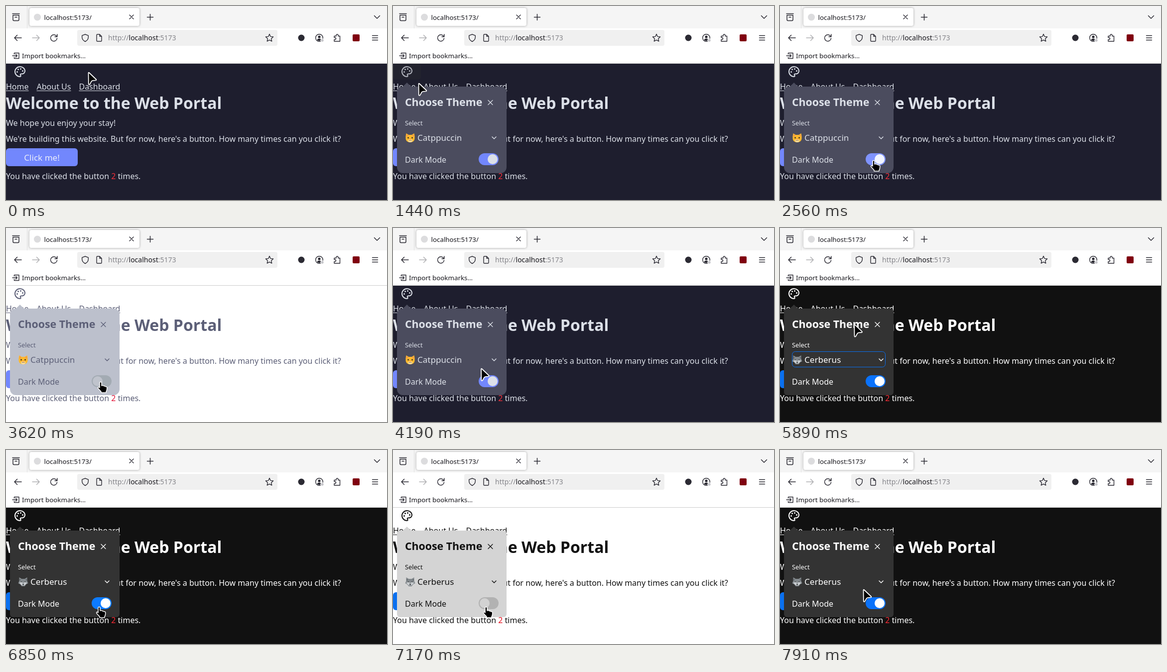
These frames come from a looping animation (765 by 390 pixels, 7.99 s). An HTML page with a canvas:

```html
<!DOCTYPE html>
<html lang="en">
<head>
<meta charset="utf-8">
<title>Theme switcher</title>
<style>
html, body { margin: 0; width: 100%; height: 100%; overflow: hidden; background: #fff; }
canvas { display: block; width: 765px; height: 390px; }
</style>
</head>
<body>
<canvas id="stage" width="765" height="390"></canvas>
<script>
const ctx = document.getElementById('stage').getContext('2d');
const LOOP = 7990, STEP = 80;
const SANS = '"Noto Sans", sans-serif';
const INK = '#2b2a33';

const THEMES = {
  catDark: { bg: '#1e1e2e', text: '#dce0e8', panel: '#4b4c5e', primary: '#7287fd', red: '#f5303a',
    track: '#7287fd', trackHover: '#7f93ff', thumb: '#dce0e8', thumbHover: '#f2f5ff', radius: 12, hover: '#22232e' },
  catLight: { bg: '#ffffff', text: '#5c5f77', panel: '#bcc0cc', primary: '#7287fd', red: '#e3173a',
    track: '#a3abb3', trackHover: '#a3abb3', thumb: '#bfc3cc', thumbHover: '#bfc3cc', radius: 12, hover: '#f4f4f6' },
  cerbDark: { bg: '#111111', text: '#ffffff', panel: '#333333', primary: '#0a70f0', red: '#fb2c36',
    track: '#0a72fb', trackHover: '#0d7bff', thumb: '#ffffff', thumbHover: '#ffffff', radius: 6, hover: '#1b1b1b' },
  cerbLight: { bg: '#ffffff', text: '#111111', panel: '#d4d4d4', primary: '#0a70f0', red: '#e7101f',
    track: '#b2b2b2', trackHover: '#b2b2b2', thumb: '#d2d2d2', thumbHover: '#d2d2d2', radius: 6, hover: '#f4f4f4' }
};

// Pointer path: time, x, y
const PATH = [
  [0, 165, 133], [320, 110, 163], [560, 54, 157], [800, 27, 131], [1200, 27, 131],
  [1440, 51, 155], [2000, 122, 253], [2560, 188, 311], [3300, 188, 311], [3460, 189, 309],
  [3540, 189, 309], [3620, 190, 310], [4030, 190, 310], [4350, 163, 254], [4930, 163, 254],
  [5490, 137, 160], [5650, 137, 160], [6450, 176, 272], [6850, 187, 316], [7670, 187, 316],
  [7910, 167, 280]
];
const BEATS = [0, 3380, 3950, 4680, 5010, 7750];
const TOGGLES = [2640, 3950, 7010, 7750];

const clamp = v => Math.max(0, Math.min(1, v));
const ramp = (t, from, len) => clamp((t - from) / len);

// Hold each picture for one step, counted from the latest beat
function hold(t) {
  const base = BEATS.filter(b => b <= t).pop();
  return base + Math.floor((t - base) / STEP) * STEP;
}

function pointerAt(t) {
  for (let i = 1; i < PATH.length; i++) {
    const [t0, x0, y0] = PATH[i - 1], [t1, x1, y1] = PATH[i];
    if (t <= t1) {
      const k = clamp((t - t0) / (t1 - t0));
      return { x: x0 + (x1 - x0) * k, y: y0 + (y1 - y0) * k };
    }
  }
  const [, x, y] = PATH[PATH.length - 1];
  return { x, y };
}

function box(x, y, w, h, r, fill, stroke, width = 1) {
  ctx.beginPath();
  ctx.roundRect(x, y, w, h, r);
  paint(fill, stroke, width);
}

function disc(x, y, r, fill, stroke, width = 1) {
  ctx.beginPath();
  ctx.arc(x, y, r, 0, Math.PI * 2);
  paint(fill, stroke, width);
}

function paint(fill, stroke, width) {
  if (fill) { ctx.fillStyle = fill; ctx.fill(); }
  if (stroke) { ctx.strokeStyle = stroke; ctx.lineWidth = width; ctx.stroke(); }
}

// Draws SVG path data with its origin at x, y
function shape(x, y, d, fill, stroke, width = 1.5) {
  const p = new Path2D(d);
  ctx.save();
  ctx.translate(x, y);
  ctx.lineCap = ctx.lineJoin = 'round';
  if (fill) { ctx.fillStyle = fill; ctx.fill(p); }
  if (stroke) { ctx.strokeStyle = stroke; ctx.lineWidth = width; ctx.stroke(p); }
  ctx.restore();
}

// Returns the x where the text ends
function label(str, x, y, size, color, weight = 400) {
  ctx.font = `${weight} ${size}px ${SANS}`;
  ctx.fillStyle = color;
  ctx.fillText(str, x, y);
  return x + ctx.measureText(str).width;
}

function drawBrowser() {
  ctx.fillStyle = '#f5f5f5';
  ctx.fillRect(0, 0, 765, 45);
  ctx.fillStyle = '#ffffff';
  ctx.fillRect(0, 45, 765, 71);
  ctx.fillStyle = '#cccccc';
  ctx.fillRect(0, 115, 765, 1);
  ctx.fillStyle = '#e0e0e0';
  ctx.fillRect(42, 0, 1, 45);

  // tab strip
  shape(12, 14, 'M1 1.5H15M2 4.5V13Q2 15.5 4 15.5H12Q14 15.5 14 13V4.5ZM6 8.5H10', null, INK);
  ctx.save();
  ctx.shadowColor = 'rgba(0,0,0,.35)';
  ctx.shadowBlur = 4;
  box(47, 4, 221, 36, 4, '#ffffff');
  ctx.restore();
  disc(63, 22.5, 7, '#dcdcde');
  label('localhost:5173/', 76.5, 28, 13.33, '#15141a');
  shape(252, 22, 'M-4 -4L4 4M4 -4L-4 4', null, INK, 1.4);
  shape(289.5, 22.5, 'M-6 0H6M0 -6V6', null, INK, 1.5);
  shape(745, 22, 'M-5.5 -2.5L0 3L5.5 -2.5', null, INK, 1.5);

  // navigation
  shape(24, 64, 'M7 0H-7M-1.5 -5.5L-7 0L-1.5 5.5', null, INK, 1.5);
  shape(60, 64, 'M-7 0H7M1.5 -5.5L7 0L1.5 5.5', null, '#b0b0b3', 1.5);
  shape(96, 64, 'M5.8 -2.8A6.5 6.5 0 1 0 6.5 1M6.8 -7V-2.3H2', null, INK, 1.5);
  box(143, 48, 402, 32, 4, '#f0f0f0');
  shape(159, 64, 'M0 -7L6.3 -4.7V-1Q6 4.5 0 7.5Q-6 4.5 -6.3 -1V-4.7Z', null, INK, 1.4);
  shape(187, 64, 'M-5 -5.5Q-5 -7 -3.5 -7H1L5 -3V5.5Q5 7 3.5 7H-3.5Q-5 7 -5 5.5ZM1 -7V-3H5', null, INK, 1.4);
  let x = label('http://', 205, 69, 14, '#85858a');
  x = label('localhost', x, 69, 14, '#15141a');
  label(':5173', x, 69, 14, '#85858a');

  ctx.beginPath();
  for (let i = 0; i < 10; i++) {
    const r = i % 2 ? 3.8 : 8, a = -Math.PI / 2 + i * Math.PI / 5;
    ctx.lineTo(529 + r * Math.cos(a), 64.5 + r * Math.sin(a));
  }
  ctx.closePath();
  ctx.lineJoin = 'round';
  paint(null, INK, 1.4);

  // toolbar buttons
  disc(593, 64, 6.5, INK);
  disc(629, 64, 7.3, null, INK, 1.4);
  disc(629, 62, 2.6, INK);
  shape(629, 64, 'M-4.5 4.5Q-4 1.5 0 1.5Q4 1.5 4.5 4.5Q0 7.5 -4.5 4.5Z', INK);
  disc(635, 69, 3.3, '#c7c7cb', '#ffffff', 1);
  shape(665, 64, 'M-6 -3.5H-2V-5A2 2 0 0 1 2 -5V-3.5H5.5V7H-6V3.5H-4.5A2 2 0 0 0 -4.5 -0.5H-6Z', null, INK, 1.4);
  box(696, 57, 14, 14, 2, '#800010');
  shape(741, 64, 'M-5.5 -4.5H5.5M-5.5 0H5.5M-5.5 4.5H5.5', null, INK, 1.4);

  // bookmarks bar
  shape(20, 100, 'M-3.5 -3V-5.5H6V5.5H-3.5V3M-7 0H2.5M-0.5 -3L2.5 0L-0.5 3', null, INK, 1.4);
  label('Import bookmarks…', 32, 105, 13.33, '#15141a');
}

function drawPage(th, hover) {
  ctx.fillStyle = th.bg;
  ctx.fillRect(0, 116, 765, 274);

  if (hover > 0) {
    ctx.globalAlpha = hover;
    box(0, 116, 56, 32, 6, th.hover);
  }
  ctx.globalAlpha = 1 - 0.22 * hover;
  shape(16, 120, 'M12 2C6.5 2 2 6.5 2 12s4.5 10 10 10c.93 0 1.65-.75 1.65-1.69 0-.44-.18-.83-.44-1.12' +
    '-.29-.29-.44-.65-.44-1.13a1.64 1.64 0 0 1 1.67-1.67h2c3.05 0 5.55-2.5 5.55-5.55C21.97 6 17.46 2 12 2z',
    null, th.text, 2);
  for (const [x, y] of [[13.5, 6.5], [17.5, 10.5], [8.5, 7.5], [6.5, 12.5]]) disc(16 + x, 120 + y, 1.5, th.text);
  ctx.globalAlpha = 1;

  let x = 0;
  for (const link of ['Home', 'About Us', 'Dashboard']) {
    const end = label(link, x, 168, 16, th.text);
    ctx.fillRect(x, 170, end - x, 1);
    x = end + 16;
  }
  label('Welcome to the Web Portal', 0, 207, 32, th.text, 700);
  label('We hope you enjoy your stay!', 0, 241, 16, th.text);
  label("We're building this website. But for now, here's a button. How many times can you click it?", 0, 273, 16, th.text);
  box(0, 286, 144, 36, 6, th.primary);
  label('Click me!', 36.3, 311, 17.07, '#eceffa');
  x = label('You have clicked the button ', 0, 348, 16, th.text);
  x = label('2', x, 348, 16, th.red);
  label(' times.', x, 348, 16, th.text);
}

function drawCat(x, y) {
  shape(x, y, 'M-8 -9L-3 -6H3L8 -9Q9.5 -3 9 2Q8 9 0 9Q-8 9 -9 2Q-9.5 -3 -8 -9Z', '#fcb92e');
  shape(x, y, 'M-7 -7L-4 -5L-7 -2ZM7 -7L4 -5L7 -2Z', '#f08a56');
  shape(x, y, 'M-5 5Q0 1 5 5Q4 9 0 9Q-4 9 -5 5Z', '#ffe3a0');
  disc(x - 4, y, 1.4, '#3a2b26');
  disc(x + 4, y, 1.4, '#3a2b26');
  shape(x, y, 'M-1.5 2.5H1.5L0 4Z', '#e5635f');
  shape(x, y, 'M-3 5Q-1.5 7 0 5Q1.5 7 3 5', null, '#6b4a2c', 0.8);
}

function drawWolf(x, y) {
  shape(x, y, 'M-8 -9L-3 -6H3L8 -9L8 -2L10 3L6 5L3 9H-3L-6 5L-10 3L-8 -2Z', '#83898d');
  shape(x, y, 'M-7 -6L-5 -4L-7 -2ZM7 -6L5 -4L7 -2Z', '#51575b');
  shape(x, y, 'M-8 2L-3 0L0 3L3 0L8 2L3 7H-3Z', '#c9cdd0');
  shape(x, y, 'M-5 -1L-2 0L-4 1ZM5 -1L2 0L4 1Z', '#222');
  shape(x, y, 'M-2 4H2L0 7Z', '#2d3033');
}

function drawPanel(th, alpha, s) {
  ctx.globalAlpha = alpha;
  shape(28, 154, 'M0 0L9 9H-9Z', th.panel);
  box(8, 162, 220, 174, th.radius, th.panel);
  label('Choose Theme', 24, 201, 21.34, th.text, 700);
  shape(195.5, 194, 'M-4.5 -4.5L4.5 4.5M4.5 -4.5L-4.5 4.5', null, th.text, 1.3);
  label('Select', 24, 240, 12.8, th.text);
  if (s.focus) box(24.5, 248.5, 187, 31, 6, null, th.primary, 1);
  if (s.cerberus) drawWolf(34.5, 265); else drawCat(34.5, 265);
  label(s.cerberus ? 'Cerberus' : 'Catppuccin', 49, 271, 17.07, th.text);
  shape(203, 265, 'M-4 -2L0 2L4 -2', null, th.text, 1.5);
  label('Dark Mode', 24, 315, 16, th.text);
  box(172, 296, 40, 24, 12, s.hot ? th.trackHover : th.track);
  disc(184 + 16 * s.slide, 308, 10, s.hot ? th.thumbHover : th.thumb);
  ctx.globalAlpha = 1;
}

function drawPointer(x, y, hand) {
  ctx.save();
  if (hand) {
    shape(x, y, 'M-2 1Q-1.8 -.5 0 -.5Q1.8 -.5 2 1V7L4 6.6Q6 6.5 6.6 7.8Q8.6 7.2 9.6 8.8Q12.5 8.2 12.8 11' +
      'L12.5 15Q12 17.5 11 19V21H1V19L-5 12.5Q-6 10.5 -4.5 9.7Q-3.3 9.3 -2 11Z', '#000', '#fff', 1.5);
  } else {
    shape(x, y, 'M.5 1.5Q.6 .2 1.8 1L16 14.5Q17 16.2 15 16.4L9.5 16.8Q7.5 17 6.5 18.6L3.2 24.5Q1.2 26 .8 23.5Z',
      '#000', '#fff', 1.8);
  }
  ctx.restore();
}

function draw(time) {
  const t = hold(time);
  const p = pointerAt(t);
  const cerberus = t >= 5730;
  const done = TOGGLES.filter(c => c <= t);
  const dark = done.length % 2 === 0;
  const k = done.length ? ramp(t, done[done.length - 1], 160) : 1;
  const th = THEMES[(cerberus ? 'cerb' : 'cat') + (dark ? 'Dark' : 'Light')];
  const onIcon = p.x < 56 && p.y < 148;
  const onToggle = p.x > 172 && p.x < 212 && p.y > 296 && p.y < 320;

  drawBrowser();
  drawPage(th, ramp(t, 640, 160) * (1 - ramp(t, 1440, 160)));
  const alpha = ramp(t, 900, 200);
  if (alpha > 0) {
    drawPanel(th, alpha, {
      cerberus,
      focus: t >= 4680 && t < 6850,
      hot: onToggle,
      slide: dark ? k : 1 - k
    });
  }
  drawPointer(p.x, p.y, onIcon || onToggle);
}

const start = performance.now();
function tick() {
  draw((performance.now() - start) % LOOP);
  requestAnimationFrame(tick);
}
tick();
</script>
</body>
</html>
```
